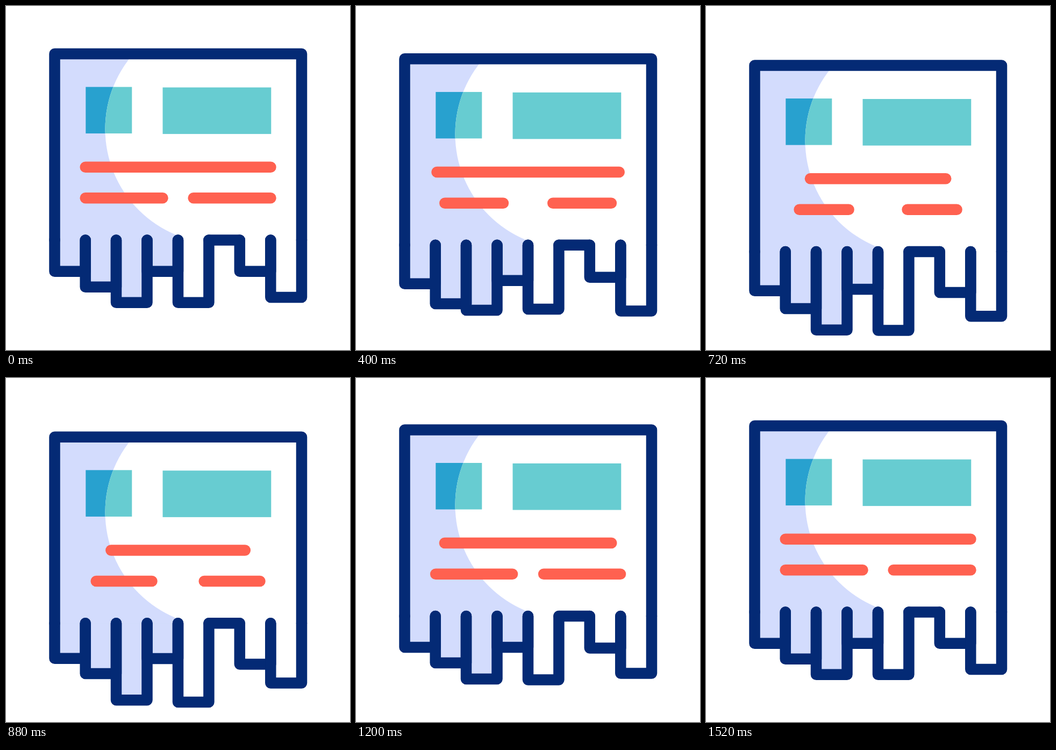
An HTML page with a canvas for the animation above (1.56 s loop, 640 by 640 pixels).

```html
<!DOCTYPE html>
<html lang="en">
<head>
<meta charset="utf-8">
<title>Tear-off notice</title>
<style>
  html, body { margin: 0; height: 100%; overflow: hidden; background: #fff; }
  canvas { display: block; width: 100vw; height: 100vh; }
</style>
</head>
<body>
<canvas id="stage" width="640" height="640"></canvas>
<script>
const ctx = document.getElementById('stage').getContext('2d');
const LOOP = 1560, STEP = 40;
const NAVY = '#042a75', SHADE = '#d3dcfd', TEAL = '#67ccd1', BLUE = '#28a1cf', RED = '#ff6150';
const TOP = 89, SLIT = 435.5;

// Pulse timing: rise start, rise end, fall start, fall end (ms)
const BODY = [90, 765, 775, 1490];
const EARLY = [80, 520, 520, 1073];
const LATE = [300, 760, 860, 1285];

// Left x, right x, resting bottom, stretch, timing
const strips = [
  [90.5, 147.7, 493.7, 17.5, [80, 550, 550, 1150]],
  [147.7, 205, 522.7, 26, EARLY],
  [205, 262.5, 551.7, 29.5, [275, 715, 780, 1262]],
  [262.5, 320, 493.7, 12.5, [160, 580, 630, 1200]],
  [320, 377.4, 551.7, 30.7, LATE],
  [434.8, 492.3, 493.7, 18, LATE],
  [492.3, 550, 542, 19, EARLY]
];

// Left x, right x, y, inset, timing
const WIDE = [320, 800, 800, 1480], SHORT = [110, 590, 695, 1250];
const bars = [
  [147.7, 492.5, 299.7, 49, WIDE],
  [147.7, 291.5, 357.3, 26, SHORT],
  [348.7, 492.5, 357.3, 26, SHORT]
];

// Ease-in-out, cubic Bezier (.42, 0, .58, 1)
function ease(x) {
  if (x <= 0) return 0;
  if (x >= 1) return 1;
  let lo = 0, hi = 1, s;
  for (let i = 0; i < 20; i++) {
    s = (lo + hi) / 2;
    const r = 1 - s;
    if (1.26 * s * r * r + 1.74 * s * s * r + s * s * s < x) lo = s; else hi = s;
  }
  return s * s * (3 - 2 * s);
}

function pulse(t, [up, top, down, end]) {
  return ease((t - up) / (top - up)) - ease((t - down) / (end - down));
}

function rect(color, x, y, w, h) {
  ctx.fillStyle = color;
  ctx.fillRect(x, y, w, h);
}

function line(color, ...points) {
  ctx.strokeStyle = color;
  ctx.beginPath();
  for (const [x, y] of points) ctx.lineTo(x, y);
  ctx.stroke();
}

function draw(t) {
  rect('#fff', 0, 0, 640, 640);
  ctx.save();
  ctx.translate(0, 21.7 * pulse(t, BODY));
  ctx.lineWidth = 20.5;
  ctx.lineCap = ctx.lineJoin = 'round';

  const bottoms = strips.map(([, , y, stretch, timing]) => y + stretch * pulse(t, timing));

  // Shaded side of the paper, then the lit circle over it
  rect(SHADE, 90.5, TOP, 229.5, SLIT - TOP + 1);
  for (let i = 0; i < 4; i++) {
    const [left, right] = strips[i];
    rect(SHADE, left, SLIT, right - left, bottoms[i] - SLIT);
  }
  rect(BLUE, 148.3, 150.6, 86, 86.5);
  ctx.save();
  ctx.beginPath();
  ctx.rect(90.5, TOP, 459.5, 380);
  ctx.clip();
  ctx.beginPath();
  ctx.arc(397.5, 229, 213, 0, 2 * Math.PI);
  ctx.clip();
  rect('#fff', 90, TOP, 460, 380);
  rect(TEAL, 148.3, 150.6, 86, 86.5);
  ctx.restore();
  rect(TEAL, 291.5, 151.5, 201.8, 86.6);

  for (const [left, right, y, inset, timing] of bars) {
    const d = inset * pulse(t, timing);
    line(RED, [left + d, y], [right - d, y]);
  }

  strips.forEach(([left, right], i) => {
    line(NAVY, [left, SLIT], [left, bottoms[i]], [right, bottoms[i]], [right, SLIT]);
  });
  line(NAVY, [377.4, SLIT], [434.8, SLIT]);
  line(NAVY, [90.5, SLIT], [90.5, TOP], [550, TOP], [550, SLIT]);
  ctx.restore();
}

function tick() {
  draw(Math.floor(performance.now() % LOOP / STEP) * STEP);
  requestAnimationFrame(tick);
}
tick();
</script>
</body>
</html>
```
